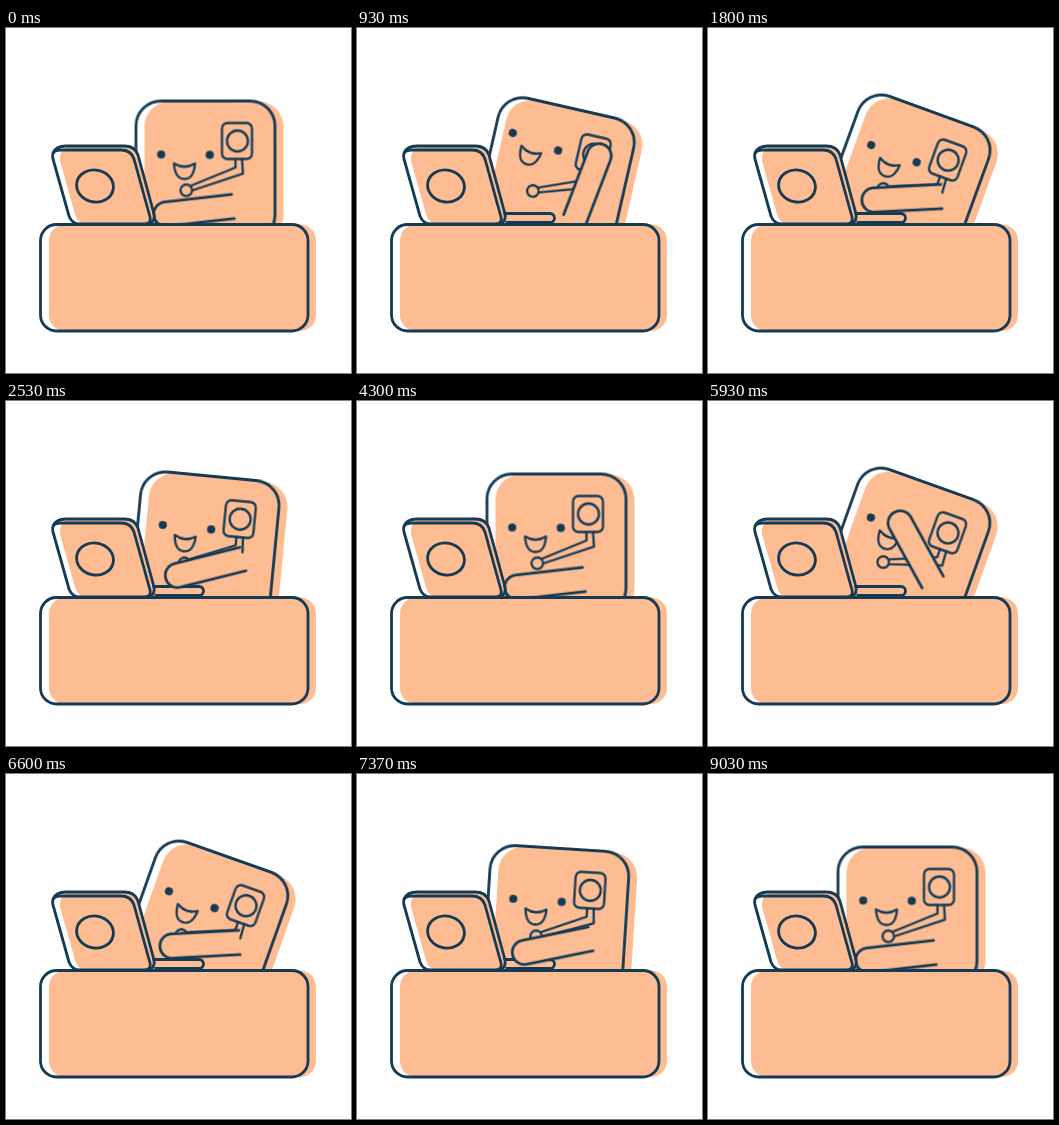
These frames come from a looping animation (345 by 345 pixels, 9530 ms). An HTML page without scripts:

```html
<!DOCTYPE html>
<html lang="en">
<head>
<meta charset="utf-8">
<title>Call desk</title>
<style>
  html, body { margin: 0; width: 100%; height: 100%; overflow: hidden; background: #fff; }
  svg { display: block; width: 100%; height: 100%; }

  .line { fill: none; stroke: #143a54; stroke-width: 2.8; stroke-linecap: round; stroke-linejoin: round; }
  .thin { stroke-width: 2.3; }
  .skin { fill: #fdbc92; }
  .ink { fill: #143a54; }

  /* The call plays twice per 9530 ms loop. */
  .move { animation: 4765ms infinite both; }
  .body { animation-name: body; }
  .face { animation-name: face; }
  .mouth { animation-name: mouth; }
  .arm { animation-name: arm; }

  :root {
    --in: cubic-bezier(.5, 0, .8, .6);
    --out: cubic-bezier(.2, .4, .5, 1);
    --both: cubic-bezier(.4, 0, .6, 1);
  }

  @keyframes body {
    0% { transform: translate(199.5px, 142.5px) rotate(0deg); animation-timing-function: var(--both); }
    8.4% { transform: translate(189.5px, 144.3px) rotate(-13deg); animation-timing-function: var(--in); }
    10.6% { transform: translate(190.5px, 144.6px) rotate(-10deg); animation-timing-function: linear; }
    19.5% { transform: translate(199px, 148px) rotate(12.8deg); animation-timing-function: var(--out); }
    26.2%, 37.8% { transform: translate(200px, 149px) rotate(20deg); animation-timing-function: var(--in); }
    53.1% { transform: translate(199.5px, 144.5px) rotate(5.5deg); animation-timing-function: var(--out); }
    60.4%, 100% { transform: translate(199.5px, 142.5px) rotate(0deg); }
  }

  @keyframes face {
    0% { transform: translate(179.5px, 126.5px) rotate(0deg); animation-timing-function: var(--both); }
    7.4% { transform: translate(162px, 130px) rotate(-9deg); animation-timing-function: var(--in); }
    10.6% { transform: translate(163px, 126px) rotate(-4.8deg); animation-timing-function: cubic-bezier(.3, .3, .6, 1); }
    19.5% { transform: translate(178.5px, 113.5px) rotate(20.7deg); animation-timing-function: var(--both); }
    26.2%, 37.8% { transform: translate(186px, 125.5px) rotate(20.3deg); animation-timing-function: var(--in); }
    53.1% { transform: translate(181px, 126px) rotate(4.8deg); animation-timing-function: var(--out); }
    60.4%, 100% { transform: translate(179.5px, 126.5px) rotate(0deg); }
  }

  @keyframes mouth {
    0%, 19.5%, 100% { transform: translate(-1px, 9px) scale(1, 1); }
    8%, 10.6% { transform: translate(1.5px, 11.5px) scale(1.05, .7); }
  }

  @keyframes arm {
    0% { transform: translate(227px, 178.5px) rotate(-6.5deg); animation-timing-function: var(--both); }
    10.6% { transform: translate(221px, 176px) rotate(90deg); animation-timing-function: var(--both); }
    19.5% { transform: translate(218px, 191px) rotate(111deg); animation-timing-function: var(--both); }
    38.4% { transform: translate(233.5px, 168.5px) rotate(-3deg); animation-timing-function: var(--both); }
    53.1% { transform: translate(237px, 158px) rotate(-14deg); animation-timing-function: var(--both); }
    60.4%, 100% { transform: translate(227px, 178.5px) rotate(-6.5deg); }
  }
</style>
</head>
<body>
<svg viewBox="0 0 345 345">
  <g class="move body">
    <rect class="skin" x="-61" y="-69" width="139" height="139" rx="25"/>
    <rect class="line" x="-69.5" y="-69.5" width="139" height="139" rx="25"/>
  </g>

  <g class="move face">
    <circle class="ink" cx="-24.3" r="4.1"/>
    <circle class="ink" cx="24.3" cy=".4" r="4.1"/>
    <path class="line thin move mouth" d="M-10.5 0Q0 6.5 10.5 0Q9.500 15.500 0 15.500T-10.500 0Z"/>
  </g>

  <!-- headset -->
  <g class="move body">
    <g class="line thin">
      <rect x="16.500" y="-47.500" width="30" height="36" rx="5.500"/>
      <circle cx="32" cy="-29.500" r="10.500"/>
      <path d="M30 -11.500V-3L-14 15M36.500 -11.500L37.500 3.200L-13.500 20"/>
      <circle class="skin" cx="-19.200" cy="19.800" r="5.800"/>
    </g>
  </g>

  <!-- keyboard -->
  <path class="line" d="M140 185.500H193A4.500 4.500 0 0 1 193 194.500H140"/>

  <g class="move arm">
    <path class="line skin" style="fill:#fdbc92" d="M0 -12.200H-67.500A12.200 12.200 0 0 0 -67.500 12.200H0"/>
  </g>

  <!-- laptop -->
  <path class="skin" d="M61 119H118Q129 118 132 127L149 196H78Q71 194 69 186L54 133Q53 122 61 119Z"/>
  <g class="line">
    <path d="M47 125Q50 118 60 118H118Q129 118 132 127L148 186Q149 192 145 195"/>
    <path d="M54 122H115Q125 122 128 131L144 189Q145.500 196 138 196H74Q66 196 63 188L47 131Q45 122 54 122Z"/>
    <ellipse cx="89" cy="158" rx="18.500" ry="16" transform="rotate(12 89 158)"/>
  </g>

  <!-- desk -->
  <rect class="skin" x="43" y="196.500" width="267" height="106.500" rx="16"/>
  <rect class="line" x="34.500" y="196.500" width="267.500" height="106.500" rx="16"/>
</svg>
</body>
</html>
```
